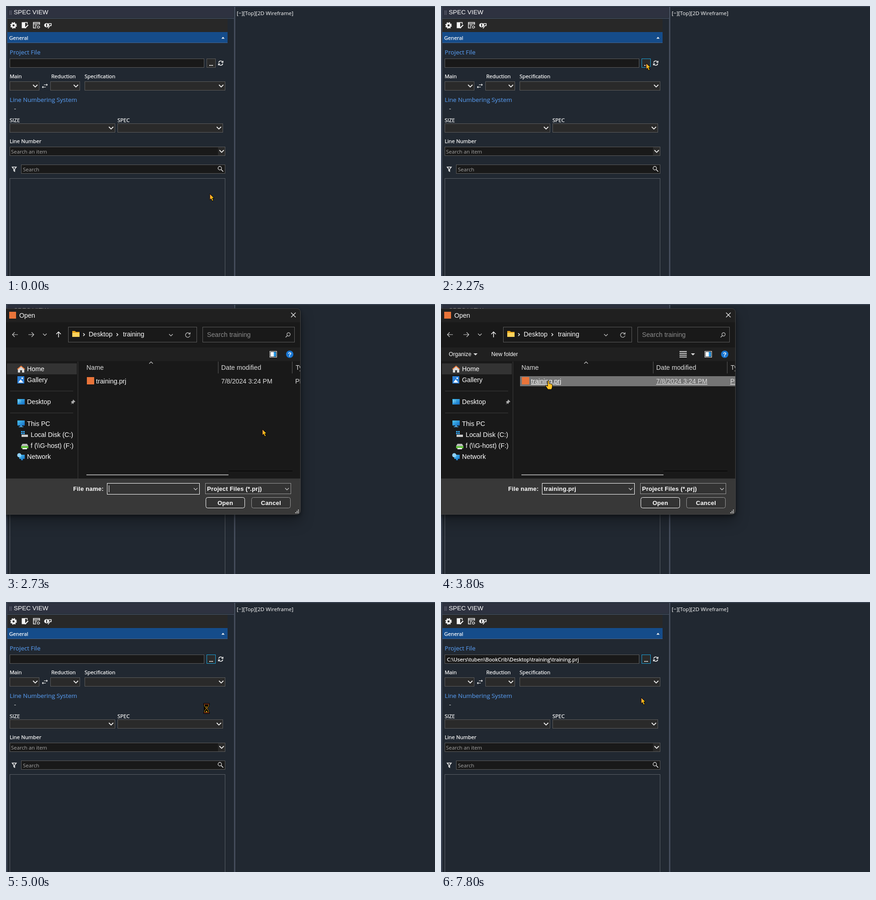
These frames come from a looping animation (939 px wide and 591 px high, 8000 ms). An HTML page:

```html
<!DOCTYPE html>
<html lang="en">
<head>
<meta charset="utf-8">
<title>Spec view</title>
<style>
html, body { margin: 0; width: 100%; height: 100%; overflow: hidden; background: #212831; }
svg { display: block; }
text { fill: #fff; stroke: #fff; stroke-width: .25px; font: 11.4px "Open Sans", sans-serif; white-space: pre; }
.head { font-size: 13.25px; fill: #5596e6; stroke: #5596e6; stroke-width: .15px; }
.hint { fill: #a6a6a6; stroke: none; }
.title { font: 13.6px "Liberation Sans", Arial, sans-serif; stroke: none; }
.box { fill: #2a2a2a; stroke: #5c5c5c; }
.dark { fill: #191919; stroke: #5c5c5c; }
.hot { stroke: #1ba1d8; }
.line { fill: none; stroke: #f4f4f4; stroke-width: 1.5; }
.thin { fill: none; stroke: #d0d0d0; stroke-width: 1.2; }
.white { fill: #f4f4f4; }
#dialog { filter: drop-shadow(0 3px 5px rgba(0,0,0,.45)) drop-shadow(0 14px 14px rgba(0,0,0,.3)); }
#dialog text { font: 14.2px "Liberation Sans", Arial, sans-serif; stroke: none; }
#dialog .small text { font-size: 12.2px; }
#dialog .bold text { font-weight: bold; font-size: 13px; letter-spacing: .25px; }
#dialog .hint { fill: #8c8c8c; }
#dialog .soft { fill: #dcdcdc; }
.picked text { text-decoration: underline; }
</style>
</head>
<body>
<svg width="939" height="591" viewBox="0 0 939 591">
  <defs>
    <path id="chevron" d="M-4.8-2.5 0 2.300 4.8-2.5" fill="none" stroke="#f4f4f4" stroke-width="1.8"/>
    <path id="small-chevron" d="M-4-2 0 2 4-2" class="thin"/>
    <path id="next" d="M-2-3 1 0-2 3" class="line"/>
    <g id="reload" class="line"><path d="M-4.5-1A4.6 4.6 0 0 1 4-2.5M4.5 1A4.6 4.6 0 0 1-4 2.5"/><path d="M5-5v3.5H1.5M-5 5V1.5h3.5"/></g>
    <linearGradient id="gold"><stop stop-color="#ff9a52"/><stop offset=".5" stop-color="#ffc20e"/></linearGradient>
    <linearGradient id="sky" x2="1" y2="1"><stop stop-color="#4cc6f5"/><stop offset="1" stop-color="#1269c0"/></linearGradient>
  </defs>

  <!-- Panel -->
  <path fill="#3b4453" d="M0 0h939v2H0zM0 0h3v591H0zM3 26h496v2H3z"/>
  <path fill="#2e3240" d="M3 3h495v22H3z"/>
  <path fill="#444c5b" d="M499 2h3v589h-3z"/>
  <path fill="#282828" d="M3 28h482v29H3z"/>
  <path fill="#154c8a" d="M3 57h482v24H3z"/>
  <path fill="#45648c" d="M3 80h482v1H3z"/>
  <path stroke="#aab" stroke-dasharray="1 1" d="M8.500 10v10M11.500 10v10"/>
  <text class="title" x="17" y="17.500">SPEC VIEW</text>
  <text x="505" y="20" style="font-size:11.6px;stroke:none">[−][Top][2D Wireframe]</text>
  <text x="7" y="74">General</text>
  <path class="white" d="M471.500 71.500h7l-3.500-4z"/>

  <!-- Toolbar icons -->
  <g transform="translate(16.500 42.500)">
    <circle r="4" class="line" style="stroke-width:3.400"/>
    <circle r="6.200" class="line" stroke-dasharray="2.700 2.170" style="stroke-width:2"/>
  </g>
  <g transform="translate(41 42)">
    <path class="white" d="M-6.500-6.500H1V6.500h-7.500z"/>
    <path class="line" d="M0-6h5.500v4M0 6h3"/>
    <path class="line" d="M1.500 5.500 7.500-.500" style="stroke-width:2.400"/>
  </g>
  <g transform="translate(67 42)">
    <path class="line" d="M-1 6h-6V-6H6.500v5M-7-3H6.500M-4 0h5M-4 3h3"/>
    <circle class="line" cx="4" cy="4" r="2.500" stroke-dasharray="1.700 .900" style="stroke-width:2"/>
  </g>
  <g transform="translate(92 43)">
    <ellipse class="white" cx="-3" cy="-1" rx="5.500" ry="4.500"/>
    <path d="M-3-4v6" stroke="#282828" stroke-width="2"/>
    <path class="line" d="M1-4.500h6V0H4M0 6 5-1"/>
  </g>

  <!-- Project -->
  <text class="head" x="8" y="106">Project File</text>
  <rect id="path-box" class="dark" x="8.500" y="115.500" width="425" height="19"/>
  <text id="path-text" x="13" y="130">C:\Users\tuben\BookCrib\Desktop\training\training.prj</text>
  <rect id="browse" class="box" x="439.500" y="115.500" width="19" height="19"/>
  <path class="white" d="M445 129h2v2h-2zM448 129h2v2h-2zM451 129h2v2h-2z"/>
  <use href="#reload" x="470" y="125"/>
  <text x="8" y="158">Main</text>
  <text x="99" y="158">Reduction</text>
  <text x="172" y="158">Specification</text>
  <rect class="box" x="8.500" y="165.500" width="64" height="19"/>
  <rect class="box" x="97.500" y="165.500" width="64" height="19"/>
  <rect class="box" x="172.500" y="165.500" width="307" height="19"/>
  <use href="#chevron" x="64" y="175"/>
  <use href="#chevron" x="153" y="175"/>
  <use href="#chevron" x="471" y="175"/>
  <path class="line" style="stroke-width:1.200" d="M83 172.500h7.500M88.500 170.500l2 2-2 2M87 177.500h-7.500M81.500 175.500l-2 2 2 2"/>

  <!-- Line numbers -->
  <text class="head" x="8" y="210">Line Numbering System</text>
  <text x="18" y="228">-</text>
  <text x="8" y="254">SIZE</text>
  <text x="244" y="254">SPEC</text>
  <rect class="box" x="8.500" y="257.500" width="230" height="19"/>
  <rect class="box" x="244.500" y="257.500" width="230" height="19"/>
  <use href="#chevron" x="230" y="267"/>
  <use href="#chevron" x="466" y="267"/>
  <text x="8" y="300">Line Number</text>
  <rect class="dark" x="8.500" y="308.500" width="471" height="19"/>
  <path fill="#2a2a2a" d="M464 309h15v18h-15z"/>
  <use href="#chevron" x="472" y="318"/>
  <text class="hint" x="11" y="323">Search an item</text>
  <path class="line" d="M13.500 352.500h9l-3.500 4.500v5l-2-1.500V357z"/>
  <rect class="dark" x="33.500" y="347.500" width="446" height="19"/>
  <text class="hint" x="37" y="362">Search</text>
  <path class="line" d="M471 358l4.500 4.500"/><circle class="line" cx="468" cy="355" r="3.800" style="stroke-width:1.200"/>
  <rect x="8.500" y="377.500" width="471" height="230" fill="none" stroke="#5a5f66"/>

  <!-- Open dialog -->
  <g id="dialog">
    <rect x="-10" y="10" width="654.500" height="450.500" rx="8" fill="#383838" stroke="#444"/>
    <svg width="644" height="460">
      <path fill="#202020" d="M0 10.500h636q8 0 8 8V40H0zM0 95h644v30H0z"/>
      <path fill="#191919" d="M0 40h644v55H0zM0 125h644v257H0z"/>
      <path fill="#e9743a" d="M7 17h15v15H7z"/>
      <text x="29" y="30">Open</text>
      <path class="line" style="stroke-width:1.200" d="M624 19l10 10M634 19l-10 10"/>
      <path class="thin" d="M26 67H14M19 62l-5 5 5 5M49 67h12M56 62l5 5-5 5"/>
      <path class="line" d="M115 73V61M110 66l5-5 5 5"/>
      <use href="#small-chevron" x="85" y="67"/>
      <rect class="dark" x="136.500" y="50.500" width="281" height="33"/>
      <rect class="dark" x="430.500" y="50.500" width="201" height="33"/>
      <path fill="#e8a317" d="M145 59h6l2 2h8v11h-16z"/><path fill="#ffd35c" d="M145 63h16v9h-16z"/>
      <use href="#next" x="171" y="67"/><text x="181" y="71">Desktop</text>
      <use href="#next" x="244" y="67"/><text x="256" y="71">training</text>
      <use href="#small-chevron" x="361" y="68"/>
      <path class="thin" d="M402.500 66a5 5 0 1 0 .300 3M403 62v4h-4"/>
      <text class="hint" x="440" y="72">Search training</text>
      <circle class="thin" cx="618.500" cy="66.500" r="3.600"/><path class="thin" d="M616 69l-4 4"/>

      <g id="tools" class="small">
        <text x="17" y="114">Organize</text>
        <text x="110" y="114">New folder</text>
        <path class="soft" d="M71 108h9l-4.500 4.500zM547 108h9l-4.500 4.500z"/>
        <path class="thin" style="stroke-width:2" d="M522 104h16M522 108h16M522 112h16M522 116h16"/>
      </g>
      <rect x="577.500" y="103.500" width="15" height="13" fill="#222" stroke="#eee"/>
      <path fill="#fff" d="M579 105h7v10h-7z"/><path fill="#2b9be8" d="M586 105h5v10h-5z"/>
      <circle cx="621" cy="110" r="8" fill="#1976d2"/>
      <g class="bold"><text x="617" y="114.500">?</text></g>

      <!-- Sidebar -->
      <path fill="#333" d="M2 130h153v24H2z"/>
      <path stroke="#3c3c3c" d="M157.500 126v256M9 190.500h138M9 238.500h138"/>
      <path fill="#d9d9d9" d="M26 142l7-6 7 6v8h-5v-5h-4v5h-5z"/>
      <path fill="none" stroke="#ef7d3c" stroke-width="2" d="M25 143l8-7 8 7"/>
      <path fill="#2c7fd6" d="M25 158h15v16H25z"/><path fill="#fff" d="M27 172l5-7 6 7zM34 161h3v3h-3z"/>
      <path fill="url(#sky)" d="M25 208h16v12H25z"/><path stroke="#fff" stroke-dasharray="2 2" d="M27 211.500h5M27 214.500h5"/>
      <path fill="#aaa" d="M147 209l5 5-3 1-2 4-2-2-3 3 2-4-2-2 4-2z"/>
      <path fill="url(#sky)" d="M25 255h16v11H25z"/><path fill="#4aa3df" d="M31 266h4v2h3v1.500H28V268h3z"/>
      <path fill="#ccc" d="M34 286h14v5H34z"/><path fill="#35a2ea" d="M33 278h3.500v3H33zM37.500 278H41v3h-3.500zM33 282h3.500v3H33zM37.500 282H41v3h-3.500z"/>
      <path fill="#bbb" d="M36 306h10l3 5H33z"/><path fill="#5fbf3b" d="M33 311h16v5H33z"/><path fill="#eee" d="M36 315h10v3H36z"/>
      <path fill="url(#sky)" d="M29 330h12v9H29zM33 339h4v3h-4z"/><circle cx="29" cy="331" r="4.500" fill="#8fd0f5"/>
      <text x="46" y="147">Home</text>
      <text x="46" y="171">Gallery</text>
      <text x="46" y="219">Desktop</text>
      <text x="46" y="267">This PC</text>
      <text x="54" y="291">Local Disk (C:)</text>
      <text x="54" y="315">f (\\G-host) (F:)</text>
      <text x="46" y="339">Network</text>

      <!-- File list -->
      <text class="soft" x="176" y="144">Name</text>
      <text class="soft" x="471" y="144">Date modified</text>
      <text class="soft" x="634" y="144">Type</text>
      <path class="thin" d="M313.500 130.500l4-4 4 4"/>
      <path stroke="#5a5a5a" d="M464.500 126v26M626.500 126v26"/>
      <g id="row">
        <rect id="row-fill" x="173" y="158" width="471" height="22"/>
        <path fill="#e9743a" d="M177 160h16v16h-16z"/>
        <text x="197" y="174">training.prj</text>
        <text class="soft" x="471" y="174">7/8/2024 3:24 PM</text>
        <text class="soft" x="633" y="174">PRJ File</text>
      </g>
      <path fill="#9c9c9c" d="M176 373h311v2H176z"/><path fill="#000" d="M487 365h140v1H487z"/>

      <!-- Footer -->
      <rect x="221.500" y="392.500" width="202" height="24" fill="#333" stroke="#fff"/>
      <rect x="436.500" y="392.500" width="187" height="23" fill="#333" stroke="#999"/>
      <rect x="437.500" y="423.500" width="85" height="23" rx="4" fill="#333" stroke="#fff"/>
      <rect x="537.500" y="423.500" width="85" height="23" rx="4" fill="#333" stroke="#999"/>
      <use href="#small-chevron" x="415" y="405"/>
      <use href="#small-chevron" x="615" y="405"/>
      <path id="caret" stroke="#fff" d="M225.500 397v15"/>
      <g class="bold">
        <text x="147" y="409">File name:</text>
        <text id="file-name" x="225" y="409">training.prj</text>
        <text x="440" y="409">Project Files (*.prj)</text>
        <text x="463" y="440">Open</text>
        <text x="558" y="440">Cancel</text>
      </g>
      <path stroke="#ccc" stroke-width="2" stroke-dasharray="2 1" d="M639 451h2M636 454h5M633 457h8"/>
    </svg>
  </g>

  <!-- Pointers, each with its hot spot at 0,0 -->
  <g id="pointer" stroke="#000">
    <path id="arrow" fill="url(#gold)" d="M0 0V13.500L3 10.800 5.500 16 8 14.800 5.700 9.700H9.700z"/>
    <path id="hand" fill="#ffc226" d="M-1.700 10V1.500a1.700 1.700 0 0 1 3.400 0V6l5 1.200q2 .600 2 2.500v4l-1.700 5.300h-8l-4-6q-2-3-.500-3.500 1.500 0 3.800 2.500z"/>
    <g id="hourglass">
      <path fill="#000" stroke="none" d="M-7-11.500H7v4H6v3L1.500 0 6 4.500v3h1v4H-7v-4h1v-3L-1.500 0-6 4.500v-3-6v-3h-1z"/>
      <path fill="none" stroke="#ffb81c" d="M-4.500-8v2.500L-.500 0l-4 5.500V8M4.500-8v2.500L.500 0l4 5.500V8"/>
      <path fill="#ffb81c" stroke="none" d="M-1.500-4h3L0-2zM0 5l2.500 3h-5z"/>
      <path stroke="#d9542b" d="M-6-9.500H6M-6 9.500H6"/>
    </g>
  </g>
</svg>
<script>
const $ = id => document.getElementById(id);
const show = (id, on) => { $(id).style.display = on ? "" : "none"; };
const LOOP = 8000, STEP = 200 / 3;

// Pointer stops: step, x, y
const stops = [
  [0, 446, 411], [4, 417, 398], [13, 618, 318], [15, 635, 300], [21, 425, 112],
  [23, 428, 117], [25, 428, 117], [33, 449, 125], [35, 449, 125], [38, 560, 271],
  [39, 561, 274], [41, 561, 274], [51, 235, 168], [57, 235, 168], [58, 245, 176],
  [60, 438, 237], [69, 438, 237], [70, 439, 238], [74, 439, 238], [78, 439, 205.5],
  [115, 439, 205.5], [117, 438, 209], [120, 438, 209]
];

function pointerAt(step) {
  const i = stops.findIndex(s => s[0] > step);
  const [k0, x0, y0] = stops[i - 1], [k1, x1, y1] = stops[i];
  const u = (step - k0) / (k1 - k0), ease = u * u * (3 - 2 * u);
  return [x0 + (x1 - x0) * ease, y0 + (y1 - y0) * ease];
}

function draw(now) {
  const step = Math.floor((now % LOOP + 5) / STEP) % 120;
  const within = (from, to) => step >= from && step < to;
  const [x, y] = pointerAt(step);
  const overRow = within(42, 58) && y < 180;
  const picked = within(52, 58);
  const hand = overRow || within(58, 60);
  const waiting = within(60, 116);

  $("pointer").setAttribute("transform", `translate(${x} ${y})`);
  show("arrow", !hand && !waiting);
  show("hand", hand);
  show("hourglass", waiting);

  $("path-box").classList.toggle("hot", within(21, 27));
  $("browse").classList.toggle("hot", step >= 30);
  show("path-text", step >= 89);

  show("dialog", within(39, 58));
  show("tools", step >= 42);
  $("row").classList.toggle("picked", overRow);
  $("row-fill").setAttribute("fill", picked ? "#757575" : overRow ? "#4d4d4d" : "none");
  show("file-name", picked);
  show("caret", !picked);
}

const start = performance.now();
(function tick() {
  draw(performance.now() - start);
  requestAnimationFrame(tick);
})();
</script>
</body>
</html>
```
